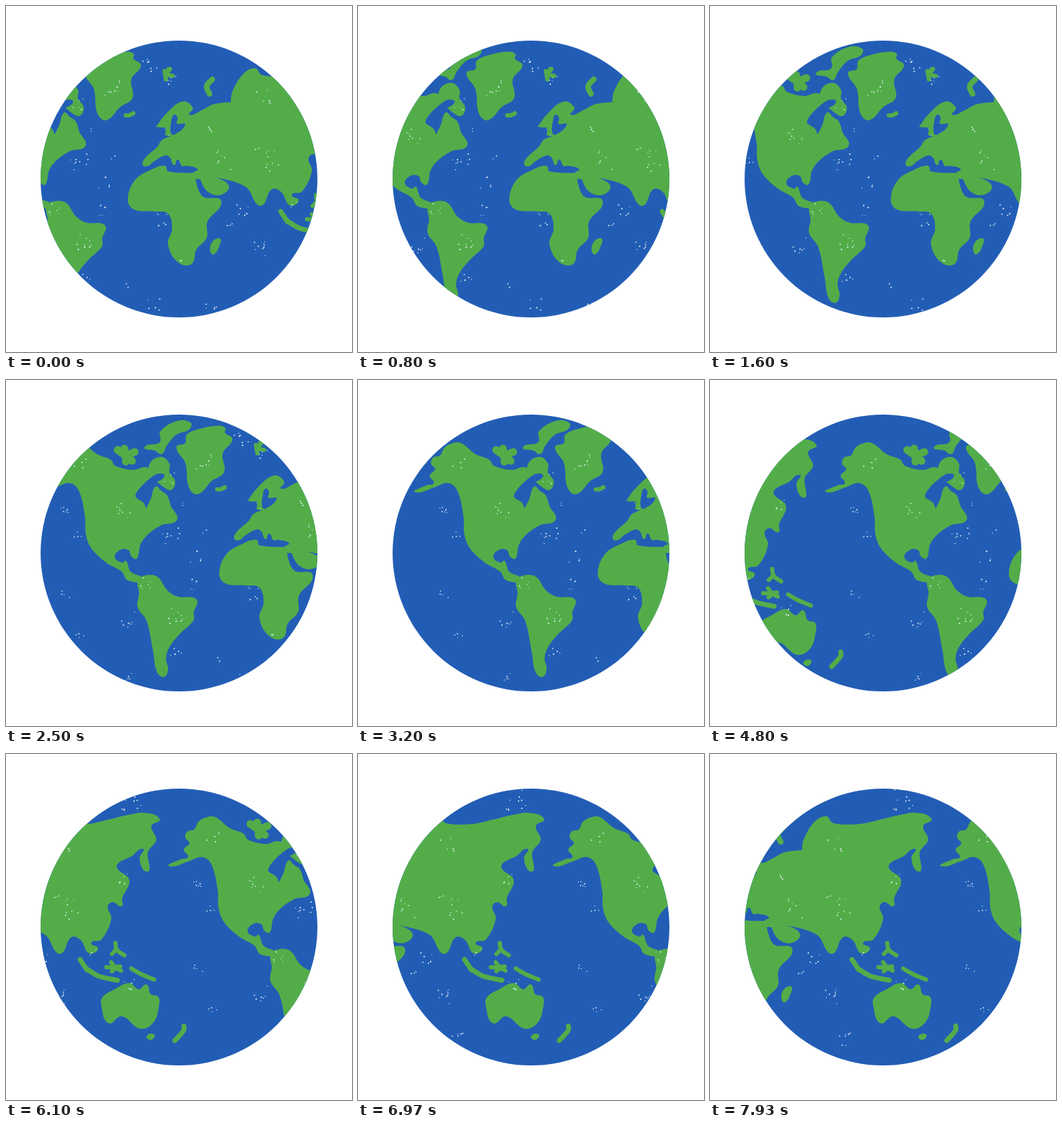
These frames come from a looping animation (500x500 px, 8000 ms). An HTML page:

```html
<!DOCTYPE html>
<html lang="en">
<head>
<meta charset="utf-8">
<title>Turning globe</title>
<style>
  html, body { margin: 0; width: 100%; height: 100%; overflow: hidden; background: #fff; }
  svg { display: block; width: 100vw; height: 100vh; }
</style>
</head>
<body>
<svg viewBox="0 0 500 500">
  <defs>
    <clipPath id="disc"><circle cx="250" cy="250" r="200"/></clipPath>
  </defs>
  <circle cx="250" cy="250" r="200" fill="#225db5"/>
  <g clip-path="url(#disc)">
    <g id="strip">
      <g id="world">
        <g id="land" fill="#52ad49"></g>
        <g id="isles" fill="none" stroke="#52ad49" stroke-linecap="round"></g>
        <g id="specks" fill="#e8f2f4"></g>
      </g>
    </g>
  </g>
</svg>
<script>
const WIDTH = 614;            // map width before it repeats
const STEP = WIDTH / 144;     // shift per step
const LOOP = 8000;
const TICK = 100 / 3;         // steps land on this time grid

// Key points of each coast; "!" marks a sharp corner.
const coasts = {
  northAmerica: `-88 162,-71 152,-61 149,-67 138,-59 129,-65 121,-62 112,-52 109,-46 98,-36 92,
    -22 91,-1 107,19 115,26 124,52 130,70 126,84 136!,55 166,67 178,70 186!,77 172,84 154,92 160,
    101 167,106 182,115 202,92 210,72 224,62 238,57 258,49 255,45 246,34 245,25 256,36 264,41 261,
    48 277,62 283!,64 293!,43 289,35 277,13 264,-9 243,-17 222,-18 198,-27 160,-40 149,-60 155`,
  southAmerica: `58 291,66 283,86 284,101 304,116 313,143 317,139 336,139 347,118 368,104 386,
    99 402,102 418,96 429,86 422,80 390,71 348,58 328,60 308`,
  baffin: `76 138,76 120,92 111,104 121,104 134,112 145,110 156,103 159,86 147!,97 138,85 136!`,
  ellesmere: `135 62,116 59,91 74,90 90,68 97,83 102,93 107,100 95,114 79,132 72`,
  greenland: `114 97,127 91,129 79,150 70,177 66,185 70,184 76,195 86,181 106,183 133,165 146,
    145 165,132 155,127 120`,
  europe: `198 230,200 221,219 203,225 194,238 188!,230 187!,231 176!,217 175!,231 156,255 138,
    270 147,265 157,282 151,300 142,325 139!,340 150!,340 230!,303 248!,322 260,310 273,291 268,
    281 251!,275 248!,271 241,277 236,262 231,254 231,248 222,243 230,237 219,230 216,213 225,206 231`,
  asia: `325 139!,327 124,343 98,360 90,370 100,409 101,437 95,467 88,490 85,512 94,500 104,507 124,
    495 142,497 168,489 168,483 150,488 137,471 148,452 158,451 166,468 182,458 208,457 220,444 214,
    437 221,442 238,428 268,413 273,423 281,410 288,398 269,384 265,372 287,363 287,346 261,303 248!`,
  africa: `176 280,186 252,211 236,230 231,234 239,271 241!,290 244!,281 250!,274 250!,284 275,
    311 282,291 312,290 335,275 352,268 373,248 370,234 344,240 322,234 300,215 297,185 294`,
  madagascar: `309 336,309 345,300 359,295 353,298 341`,
  australia: `-186 365,-185 352,-167 340,-146 331,-132 340,-121 333,-115 347,-104 351,-103 364,
    -111 388,-130 397,-157 379,-176 389`,
  tasmania: `-121 408,-110 405,-114 413`
};
const baltic = `238 183,239 166,243 157,248 162,247 170,259 171,243 186`;

// Thin islands: stroke width, then the points of each branch.
const isles = [
  [7, "-217 297,-207 312", "-207 311,-190 321,-163 327"],
  [6, "-166 273,-164 283,-153 291", "-164 282,-171 289"],
  [6, "-179 308,-167 309,-158 313", "-172 301,-167 309,-171 314", "-167 308,-159 307"],
  [6, "-143 310,-129 318,-110 326"],
  [7, "-67 393,-67 399,-80 414"],
  [8, "298 106,290 116,294 127"],
  [6, "229 94,231 106", "231 103,235 91", "237 91,233 98,241 101"],
  [11, "29 101,41 108,54 104", "39 99,41 109,50 117", "41 108,41 118"],
  [6, "173 158,178 158,184 155"]
];

// Clusters of specks: centre and count.
const clusters = `156 118 8,208 85 7,238 110 5,106 225 9,142 254 5,128 180 2,155 217 2,137 296 4,
  72 292 6,110 338 9,112 395 6,180 404 3,214 432 5,234 182 2,298 179 3,313 218 6,222 310 6,326 237 1,
  252 367 2,340 293 6,325 312 3,362 355 9,296 434 5,385 414 7,372 130 7,377 222 12,463 180 5,
  418 284 3,-145 68 11,-50 185 6,-30 225 4,-46 312 4,-25 373 4,42 346 7,40 428 6,-25 118 5,
  36 190 8,-145 333 5,103 142 5`;

const parse = text => text.split(",").map(item => {
  const [x, y, n] = item.trim().split(" ").map(parseFloat);
  return { x, y, n, sharp: item.includes("!") };
});

function add(parent, tag, attrs) {
  const node = document.createElementNS("http://www.w3.org/2000/svg", tag);
  for (const key in attrs) node.setAttribute(key, attrs[key]);
  return parent.appendChild(node);
}

// Smooth curve through the points of a text.
function smooth(text, closed = true) {
  const points = parse(text), n = points.length;
  const at = i => closed ? points[(i + n) % n] : points[Math.max(0, Math.min(n - 1, i))];
  const tangent = i => {
    if (at(i).sharp) return [0, 0];
    const a = at(i - 1), b = at(i + 1);
    const len = Math.hypot(b.x - a.x, b.y - a.y) || 1;
    return [(b.x - a.x) / len, (b.y - a.y) / len];
  };
  let d = `M${at(0).x} ${at(0).y}`;
  for (let i = 0; i < (closed ? n : n - 1); i++) {
    const p = at(i), q = at(i + 1);
    const reach = Math.hypot(q.x - p.x, q.y - p.y) * 0.36;
    const [ax, ay] = tangent(i), [bx, by] = tangent(i + 1);
    d += `C${p.x + ax * reach} ${p.y + ay * reach} ${q.x - bx * reach} ${q.y - by * reach} ${q.x} ${q.y}`;
  }
  return closed ? d + "Z" : d;
}

let seed = 7;
function random() {
  seed = (seed * 16807) % 2147483647;
  return seed / 2147483647;
}

const byId = id => document.getElementById(id);
const strip = byId("strip");

for (const text of Object.values(coasts)) add(byId("land"), "path", { d: smooth(text) });
add(byId("land"), "path", { d: smooth(baltic), fill: "#225db5" });

for (const [width, ...branches] of isles) {
  const d = branches.map(text => smooth(text, false)).join("");
  add(byId("isles"), "path", { d, "stroke-width": width });
}

for (const { x, y, n } of parse(clusters)) {
  const spread = 5 + n * 2.6;
  for (let i = 0; i < n; i++) {
    add(byId("specks"), "circle", {
      cx: x + (random() - 0.5) * spread,
      cy: y + (random() - 0.5) * spread,
      r: 0.6 + random() * 0.5
    });
  }
}

for (const x of [-WIDTH, WIDTH]) add(strip, "use", { href: "#world", x });

function draw() {
  const tick = Math.floor((performance.now() % LOOP + 3.4) / TICK);
  const step = Math.floor(tick * 5 / 12) % 100;
  strip.setAttribute("transform", `translate(${step * STEP} 0)`);
  requestAnimationFrame(draw);
}
draw();
</script>
</body>
</html>
```
